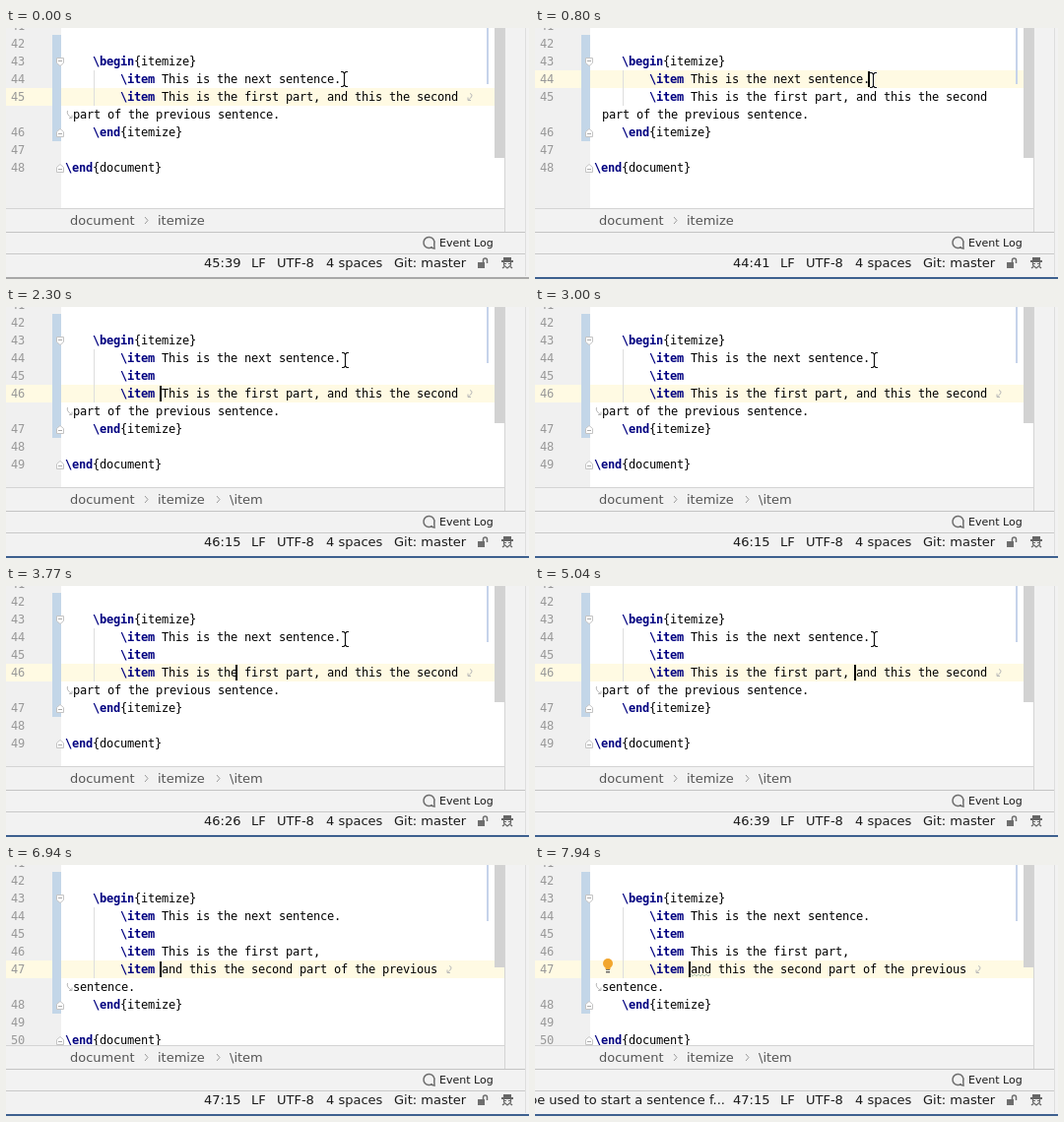
These frames come from a looping animation (531 px wide and 255 px high, 8 s). An HTML page with a canvas:

```html
<!DOCTYPE html>
<html lang="en">
<head>
<meta charset="utf-8">
<title>Editor</title>
<style>
html, body { margin: 0; width: 100%; height: 100%; overflow: hidden; background: #f2f2f2; }
canvas { display: block; width: 531px; height: 255px; }
</style>
</head>
<body>
<canvas id="stage" width="531" height="255"></canvas>
<script>
const ctx = document.getElementById('stage').getContext('2d');
const LOOP = 8000, CHAR = 7, ROW = 18, LEFT = 60, TOP = 7;
const MONO = '12px "DejaVu Sans Mono", monospace';
const UI = '"DejaVu Sans", sans-serif';

// Caret stops: time, line, column
const stops = [
  [-1000, 45, 39], [400, 44, 41], [1750, 45, 15], [2300, 46, 15],
  [3300, 46, 19], [3530, 46, 22], [3770, 46, 26], [4000, 46, 32],
  [4250, 46, 37], [4600, 46, 38], [4900, 46, 39], [6700, 47, 15]
];
const ENTER1 = 1750, ENTER2 = 6700, WARN = 7510, BULB = 7700, POINTER_OFF = 6450;

const pad = n => ' '.repeat(n);
const item = text => pad(8) + '\\item ' + text;
const head = ['', pad(4) + '\\begin{itemize}', item('This is the next sentence.')];
const tail = [pad(4) + '\\end{itemize}', '', '\\end{document}'];
const whole = [item('This is the first part, and this the second '), 'part of the previous sentence.'];
const split = [item('and this the second part of the previous '), 'sentence.'];
const docs = [
  [...head, whole, ...tail],
  [...head, item(''), whole, ...tail],
  [...head, item(''), item('This is the first part,'), split, ...tail]
];

function rect(x, y, w, h, color) {
  ctx.fillStyle = color;
  ctx.fillRect(x, y, w, h);
}

function path(points, color, width = 1, fill) {
  ctx.beginPath();
  points.forEach(([x, y], i) => i ? ctx.lineTo(x, y) : ctx.moveTo(x, y));
  if (fill) {
    ctx.closePath();
    ctx.fillStyle = fill;
    ctx.fill();
  }
  ctx.strokeStyle = color;
  ctx.lineWidth = width;
  ctx.stroke();
}

function label(text, x, y, size = 13, color = '#1a1a1a', align = 'left') {
  ctx.font = size + 'px ' + UI;
  ctx.fillStyle = color;
  ctx.textAlign = align;
  ctx.fillText(text, x, y);
  ctx.textAlign = 'left';
}

function code(text, x, y, color = '#000') {
  const word = /^\s*\\\w+/.exec(text);
  const bold = word ? word[0].length : 0;
  [...text].forEach((ch, i) => {
    ctx.font = (i < bold ? 'bold ' : '') + MONO;
    ctx.fillStyle = i < bold ? '#000080' : color;
    ctx.fillText(ch, x + i * CHAR, y);
  });
}

function foldMark(y, open) {
  const s = open ? 1 : -1, c = y + 9.5;
  path([[51.5, c - 4 * s], [58.5, c - 4 * s], [58.5, c + s], [55, c + 4 * s],
    [51.5, c + s], [51.5, c - 4 * s]], '#c4c4c4', 1, '#fff');
  path([[53, c - s], [57, c - s]], '#aaa');
}

function wrapMark(x, y, start) {
  ctx.strokeStyle = '#b8b8b8';
  ctx.lineWidth = 1;
  ctx.beginPath();
  if (start) {
    ctx.moveTo(x + 2.5, y + 5);
    ctx.quadraticCurveTo(x + 1, y + 9, x + 7, y + 12.5);
    ctx.moveTo(x + 7, y + 9.5);
    ctx.lineTo(x + 7, y + 12.5);
    ctx.lineTo(x + 4, y + 12.5);
  } else {
    ctx.moveTo(x + 5, y + 5.5);
    ctx.quadraticCurveTo(x + 10, y + 7, x + 3, y + 12.5);
    ctx.moveTo(x + 3, y + 9.5);
    ctx.lineTo(x + 3, y + 12.5);
    ctx.lineTo(x + 6, y + 12.5);
  }
  ctx.stroke();
}

function bulb() {
  ctx.fillStyle = '#f2a62e';
  ctx.beginPath();
  ctx.arc(74, 100, 5, 0, Math.PI * 2);
  ctx.fill();
  rect(71.5, 103, 5, 3, '#f2a62e');
  rect(72, 106, 4, 1, '#777');
  rect(72, 108, 4, 1.5, '#666');
}

function pointer(t) {
  const x = t < 1000 ? 343 : 344, y = t < 400 ? 52 : t < 1000 ? 53 : 54;
  for (const [w, color] of [[3, '#fff'], [1.2, '#111']]) {
    path([[x - 3, y - 7.5], [x - 1, y - 7.5], [x + 0.5, y - 6], [x + 2, y - 7.5], [x + 4, y - 7.5]], color, w);
    path([[x + 0.5, y - 6], [x + 0.5, y + 6]], color, w);
    path([[x - 3, y + 7.5], [x - 1, y + 7.5], [x + 0.5, y + 6], [x + 2, y + 7.5], [x + 4, y + 7.5]], color, w);
  }
}

function editor(t, stage, stop) {
  const [since, line, col] = stop;
  const caretY = TOP + (line - 42) * ROW;
  ctx.save();
  ctx.beginPath();
  ctx.rect(0, 0, 531, 183);
  ctx.clip();
  rect(0, 0, 56, 183, '#f0f0f0');
  rect(56, 0, 450, 183, '#fff');
  rect(0, caretY, 506, ROW, '#fffae3');
  rect(47, TOP, 9, (6 + stage) * ROW, '#c3d6e8');
  rect(89, 43, 1, (2 + stage) * ROW, '#dedede');
  code('41', 5, TOP - 5, '#999');

  let y = TOP;
  docs[stage].forEach((entry, i) => {
    const n = 42 + i, wrapped = Array.isArray(entry);
    const text = wrapped ? entry[0] : entry;
    code(String(n), 5, y + 13, '#999');
    code(text, LEFT, y + 13);
    if (/\\(begin|end)/.test(text)) foldMark(y, text.includes('begin'));
    if (wrapped) {
      if (n === line) {
        wrapMark(LEFT + text.length * CHAR, y);
        wrapMark(LEFT, y + ROW, true);
      }
      y += ROW;
      code(entry[1], LEFT + 8, y + 13);
    }
    y += ROW;
  });

  if (t >= WARN) {
    const wave = Array.from({ length: 11 }, (_, i) => [158 + i * 2, i % 2 ? 113 : 111]);
    path(wave, '#b5c4ad');
  }
  if (t >= BULB) bulb();
  if (t >= 400 && (t - since) % 1000 < 500) {
    rect(LEFT + (col - 1) * CHAR - 2, caretY + 1, 2, 16, '#000');
  }
  rect(488, 0, 2, 57, '#c6d3ea');
  rect(496, 0, 10, 132 - stage * 14, '#d2d2d2');
  ctx.restore();
}

function icons() {
  ctx.strokeStyle = '#6e6e6e';
  ctx.lineWidth = 1.5;
  ctx.beginPath();
  ctx.arc(429.5, 218, 5.5, 0.9, Math.PI * 2 + 0.3);
  ctx.lineTo(435, 224);
  ctx.lineTo(431, 223);
  ctx.stroke();

  rect(479, 238, 7, 6, '#6e6e6e');
  ctx.beginPath();
  ctx.moveTo(484.5, 238);
  ctx.lineTo(484.5, 236);
  ctx.arc(486.5, 236, 2, Math.PI, 0);
  ctx.lineTo(488.5, 239);
  ctx.stroke();

  rect(505, 233, 8, 4, '#666');
  rect(503, 236, 12, 2, '#666');
  path([[505.5, 238], [505.5, 241], [509, 244], [512.5, 241], [512.5, 238]], '#666', 1.2);
  rect(506, 239, 2, 1, '#666');
  rect(510, 239, 2, 1, '#666');
  path([[504, 244], [506, 242.5]], '#666', 1.5);
  path([[514, 244], [512, 242.5]], '#666', 1.5);
}

function chrome(t, stage, line, col) {
  rect(0, 183, 506, 1, '#d4d4d4');
  rect(506, 0, 1, 207, '#d4d4d4');
  rect(0, 207, 527, 1, '#c4c4c4');
  rect(0, 229, 527, 1, '#c9c9c9');
  rect(527, 0, 1, 252, '#dedede');
  rect(0, 253, 531, 2, t < 400 ? '#a8a8a8' : '#3d608f');

  const crumbs = [['document', 65], ['itemize', 154], ['\\item', 227]];
  crumbs.slice(0, stage ? 3 : 2).forEach(([name, x], i) => {
    label(name, x, 200, 13, '#555');
    if (i) path([[x - 13, 192], [x - 10, 195.5], [x - 13, 199]], '#999');
  });

  label('Event Log', 440, 222, 11);
  if (t >= WARN) label('be used to start a sentence f...', 193, 243, 13, '#1a1a1a', 'right');
  const status = [[line + ':' + col, 201], ['LF', 249], ['UTF-8', 275], ['4 spaces', 325], ['Git: master', 394]];
  for (const [text, x] of status) label(text, x, 243);
  icons();
}

function draw(now) {
  const t = now % LOOP;
  const stage = t < ENTER1 ? 0 : t < ENTER2 ? 1 : 2;
  const stop = stops.filter(s => s[0] <= t).pop();
  rect(0, 0, 531, 255, '#f2f2f2');
  editor(t, stage, stop);
  chrome(t, stage, stop[1], stop[2]);
  if (t < POINTER_OFF) pointer(t);
}

const start = performance.now();
function tick() {
  draw(performance.now() - start);
  requestAnimationFrame(tick);
}
tick();
</script>
</body>
</html>
```
